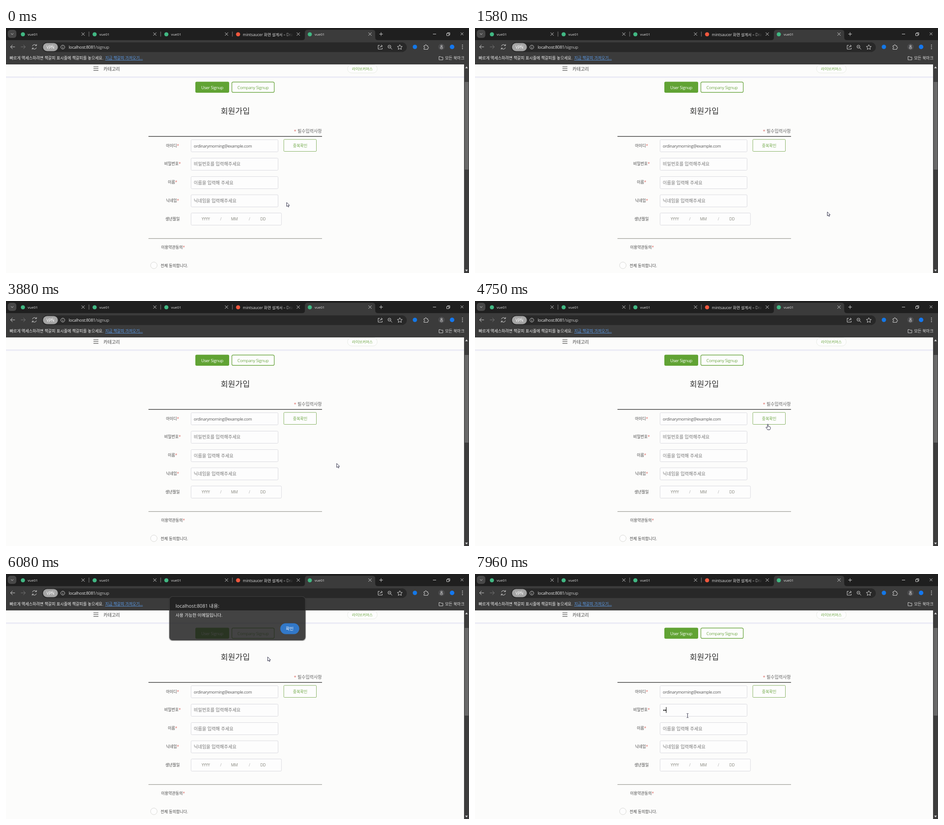
An HTML page that plays this animation: 1027 by 545 pixels, repeating every 8000 ms.

```html
<!DOCTYPE html>
<html lang="ko">
<head>
<meta charset="utf-8">
<title>회원가입</title>
<style>
  html, body { margin: 0; width: 100%; height: 100%; overflow: hidden; background: #fcfcfb; }
  svg { display: block; width: 100%; height: 100%; }
  text { font-family: "Open Sans", "Noto Sans CJK KR", "Noto Sans CJK", sans-serif; white-space: pre; }
  .tight { letter-spacing: -.3px; }
  .line { fill: none; stroke: #d4d4d4; stroke-width: 1; }
  .field { fill: #fdfdfd; stroke: #d9d9df; }
</style>
</head>
<body>
<svg viewBox="0 0 1027 545">
  <defs>
    <linearGradient id="shade" x2="0" y2="1">
      <stop stop-color="#e0e0f2"/><stop offset="1" stop-color="#fcfcfb"/>
    </linearGradient>
    <linearGradient id="fade">
      <stop stop-color="#1f1f1f" stop-opacity="0"/><stop offset="1" stop-color="#1f1f1f"/>
    </linearGradient>
  </defs>

  <!-- Browser frame -->
  <rect width="1027" height="28" fill="#1f1f1f"/>
  <rect y="27" width="1027" height="54" fill="#3b3b3b"/>
  <path d="M657 27q6 0 6-6V10q0-6 6-6h144q6 0 6 6v11q0 6 6 6z" fill="#3b3b3b"/>
  <rect x="4" y="4" width="19" height="18" rx="6" fill="#484848"/>
  <path class="line" d="M11 12l2.700 2.700L16.400 12"/>
  <g id="tabs"></g>
  <path class="line" d="M828 13.500h8m-4-4v8M947 13.500h7M1008.500 10l6 6m0-6l-6 6M977.500 12h5v5h-5zM979.500 12v-1.500h5v5H982.500"/>

  <!-- Toolbar -->
  <rect x="80" y="32" width="809" height="21.500" rx="10.700" fill="#282828"/>
  <path class="line" d="M20 42H10m4.500-4.500L10 42l4.500 4.500"/>
  <path class="line" style="stroke:#777" d="M33 42h10m-4.500-4.500L43 42l-4.500 4.500"/>
  <path class="line" d="M58.500 40.500a4.800 4.800 0 0 1 8.500-1.700m.8-2.800v3.300h-3.300M67.500 43.500a4.800 4.800 0 0 1-8.500 1.700m-.8 2.800v-3.300h3.300"/>
  <rect x="82" y="33.500" width="33" height="18" rx="9" fill="#a5a5a5"/>
  <path class="line" d="M94 47.500l10-10.500"/>
  <circle class="line" cx="126" cy="42.500" r="4.300"/>
  <path class="line" d="M126 40v.9m0 1.200v2.900"/>
  <path class="line" d="M829 38.500h-3.500v8.500h9v-3M829 44q.5-4 5-4m-2-2.500l3 2.500-3 2.500"/>
  <circle class="line" cx="850.500" cy="41.500" r="3.300"/>
  <path class="line" d="M853 44l3.500 3.500M849 41.500h3"/>
  <path class="line" d="M873.500 37l1.600 3.700 4 .4-3 2.700.9 4-3.500-2.100-3.500 2.100.9-4-3-2.700 4-.4z"/>
  <circle cx="907" cy="42" r="4.800" fill="#1478e8"/>
  <path class="line" d="M927 39.500h2.500q0-2.500 1.700-2.500t1.700 2.500h2.600v2.600q2 0 2 1.600t-2 1.600v2.200H927v-2.500q2-.2 2-1.400t-2-1.400z"/>
  <circle cx="966" cy="42" r="7" fill="#4c4c4e"/>
  <circle class="line" cx="966" cy="40" r="1.700"/>
  <ellipse class="line" cx="966" cy="44.300" rx="2.800" ry="1.800"/>
  <circle cx="989.500" cy="42" r="5" fill="#1478f0"/>
  <path d="M1012.500 38v.1m0 3.900v.1m0 3.900v.1" stroke="#e4e4e4" stroke-width="2" stroke-linecap="round"/>
  <path class="line" d="M960.500 63.500h3.200l1.200 1.400h4.100v6h-8.500z"/>

  <!-- Page -->
  <rect y="81" width="1016" height="464" fill="#fcfcfb"/>
  <rect y="108" width="1016" height="4" fill="url(#shade)"/>
  <path d="M194 86.500h11M194 90.500h11M194 94.500h11" stroke="#333" stroke-width="1.200"/>
  <rect x="757.500" y="81.500" width="66" height="18.500" rx="9.200" fill="#fdfdfd" stroke="#e8ece4"/>
  <rect x="420" y="119.500" width="75" height="24.500" rx="3" fill="#61a334"/>
  <rect x="501" y="120.200" width="94" height="23" rx="3" fill="#fdfdfd" stroke="#70a947" stroke-width="1.400"/>
  <path d="M316 241.200h385" stroke="#454545" stroke-width="1.600"/>
  <path d="M316 468.300h385" stroke="#85857c"/>
  <g id="fields"></g>
  <rect x="616.200" y="247.900" width="72.300" height="26.600" rx="1.500" fill="#fdfdfd" stroke="#86b162"/>
  <circle cx="328" cy="528" r="7.300" fill="#fdfdfd" stroke="#d9d9d6"/>
  <g id="labels"></g>
  <text id="hint" x="416.500" y="306" font-size="10" fill="#777">비밀번호를 입력해주세요</text>
  <g id="dots" fill="#222"><circle cx="419" cy="303" r="1.500"/><circle cx="422.600" cy="303" r="1.500"/></g>
  <path id="caret" d="M0 296v13" stroke="#222" stroke-width="1.200"/>

  <!-- Scrollbar -->
  <rect x="1016" y="81" width="11" height="464" fill="#3d3d3d"/>
  <rect x="1017.500" y="120" width="8.500" height="195" fill="#696969"/>
  <path d="M1018.500 89.500l3-4 3 4zM1018.500 537.500l3 4 3-4z" fill="#d8d8d8"/>

  <!-- Alert -->
  <g id="alert">
    <rect x="362" y="57" width="302.500" height="98" rx="8" fill="#000" opacity=".18"/>
    <rect x="363.500" y="56.500" width="299.500" height="96.500" rx="7" fill="#1f1f1f" stroke="#484848"/>
    <rect id="ring" x="605.500" y="113" width="46" height="28.500" rx="14.200" fill="none" stroke="#1673dd" stroke-width="1.300"/>
    <rect id="confirm" x="607.700" y="115.200" width="41.800" height="24.200" rx="12.100"/>
    <g id="alertText"></g>
  </g>

  <g id="cursor" stroke="#34344c" fill="#fff" stroke-linejoin="round">
    <path id="arrow" d="M0 0v9l2.100-1.800 1.500 3.100 1.500-.7-1.500-2.900h2.900z"/>
    <path id="hand" d="M-1 1q0-1.200 1-1.200t1 1.200v4l4 1q1 .3 1 1.500-.2 3-1.500 5H-.5q-1-2-3.500-4.700-.4-1.500 1-1.300l2 1.300z"/>
    <path id="beam" d="M-2-4.500h1.500l.5.500.5-.5H2M0-4v8m-2 .5h1.500L0 4l.5.500H2" fill="none"/>
  </g>
</svg>
<script>
const $ = id => document.getElementById(id);
const add = (id, markup) => $(id).insertAdjacentHTML('beforeend', markup);

// Text placed by its vertical middle.
const label = (x, middle, size, fill, words, extra = '') =>
  `<text x="${x}" y="${middle + size * .37}" font-size="${size}" fill="${fill}" ${extra}>${words}</text>`;
const MIDDLE = 'text-anchor="middle" ', TIGHT = 'class="tight"', MEDIUM = 'font-weight="500"';
const STAR = '<tspan fill="#d86058">*</tspan>';

for (let i = 0; i < 5; i++) {
  const x = 37.5 + i * 159.1;
  const design = i === 3;
  add('tabs', `<circle cx="${x}" cy="14" r="4.600" fill="${design ? '#f2583e' : '#41b883'}"/>`
    + label(x + 10.5, 14.5, design ? 8.5 : 8, '#e0e0e0', design ? 'mintsaucer 화면 설계서 – Draft' : 'vue01')
    + (design ? '<rect x="619" y="6" width="18" height="17" fill="url(#fade)"/><rect x="637" y="6" width="20" height="17" fill="#1f1f1f"/>' : '')
    + `<path class="line" d="M${x + 130} 10l7 7m0-7l-7 7"/>`
    + (i < 3 ? `<path d="M${x + 146.5} 8v11" stroke="#777" stroke-width="1.200"/>` : ''));
}

for (const [y, width] of [[248.5, 193], [289.5, 193], [330.5, 193], [371, 193], [411.5, 200.5]])
  add('fields', `<rect class="field" x="410.500" y="${y}" width="${width}" height="27" rx="2"/>`);

add('labels', [
  label(139, 42.5, 9.4, '#e8e8e8', 'localhost:8081<tspan fill="#c4c4c4">/signup</tspan>', TIGHT),
  label(98.5, 42.5, 9, '#fff', 'VPN', MIDDLE),
  label(8, 67, 8.8, '#f2f2f2', '빠르게 액세스하려면 책갈피 표시줄에 책갈피를 놓으세요.', MEDIUM),
  label(220, 67, 8.7, '#5b9be8', '지금 책갈피 가져오기...', 'text-decoration="underline"'),
  label(974, 67, 8.8, '#dedede', '모든 북마크'),
  label(216, 91, 10, '#444', '카테고리'),
  label(790.5, 90.5, 8.3, '#70a947', '라이브커머스', MIDDLE),
  label(457.5, 132.5, 9.3, '#fff', 'User Signup', MIDDLE + TIGHT),
  label(548, 132.5, 9.3, '#70a947', 'Company Signup', MIDDLE + TIGHT),
  label(508.5, 184, 17.6, '#333', '회원가입', MIDDLE),
  label(700.5, 229.5, 9.8, '#666', STAR + ' 필수입력사항', 'text-anchor="end"'),
  label(369.5, 261.5, 8.7, '#444', '아이디' + STAR, MIDDLE),
  label(369.5, 302, 8.7, '#444', '비밀번호' + STAR, MIDDLE),
  label(369.5, 343, 8.7, '#444', '이름' + STAR, MIDDLE),
  label(369.5, 384, 8.7, '#444', '닉네임' + STAR, MIDDLE),
  label(369.5, 425, 8.7, '#444', '생년월일', MIDDLE),
  label(416.5, 263, 9.1, '#555', 'ordinarymorning@example.com', TIGHT),
  label(416.5, 344, 10, '#777', '이름을 입력해 주세요'),
  label(416.5, 384.5, 10, '#777', '닉네임을 입력해주세요'),
  label(652.5, 262, 8.7, '#70a947', '중복확인', MIDDLE),
  label(443, 425, 8.6, '#85857c', 'YYYY', MIDDLE + TIGHT),
  label(476.5, 425, 8.6, '#aaa', '/', MIDDLE),
  label(506.5, 425, 8.6, '#85857c', 'MM', MIDDLE + TIGHT),
  label(540, 425, 8.6, '#aaa', '/', MIDDLE),
  label(570, 425, 8.6, '#85857c', 'DD', MIDDLE + TIGHT),
  label(344, 488, 8.7, '#444', '이용약관동의' + STAR),
  label(343, 528.5, 8.7, '#444', '전체 동의합니다.'),
].join(''));

add('alertText', label(377, 77.5, 10.6, '#fff', 'localhost:8081 내용:')
  + label(377, 97.5, 9.5, '#f0f0f0', '사용 가능한 이메일입니다.')
  + label(628.5, 127.5, 9.2, '#fff', '확인', MIDDLE));

// Pointer stops: time, x, y.
const stops = [
  [0, 622.5, 388], [250, 622.5, 388], [1250, 781.5, 409], [1800, 781.5, 409], [2300, 779.5, 409],
  [3500, 779.5, 409], [4450, 649.5, 274], [5250, 649.5, 274], [5750, 626, 130],
  [5860, 626, 130], [6080, 580.5, 184.5], [6250, 553, 217], [6900, 471.5, 315], [8000, 471.5, 315],
];
const clamp = v => Math.max(0, Math.min(1, v));
const ease = v => v * v * (3 - 2 * v);

function pointerAt(t) {
  const i = stops.findIndex(s => s[0] > t);
  const [t0, x0, y0] = stops[i - 1], [t1, x1, y1] = stops[i];
  const k = ease((t - t0) / (t1 - t0));
  return [x0 + (x1 - x0) * k, y0 + (y1 - y0) * k];
}

const show = (id, on) => $(id).style.display = on ? '' : 'none';

function draw(now) {
  const t = now % 8000;
  const [x, y] = pointerAt(t);
  const inside = (left, top, right, bottom) => x > left && x < right && y > top && y < bottom;
  const hand = t < 5260 && inside(616, 247, 689, 275);
  const beam = inside(410, 248, 604, 276) || inside(410, 289, 604, 318);
  $('cursor').setAttribute('transform', `translate(${x} ${y})`);
  show('hand', hand);
  show('beam', beam);
  show('arrow', !hand && !beam);

  // The alert rises and grows slightly while it fades out.
  const opening = clamp((t - 4960) / 110), closing = clamp((t - 6000) / 200);
  const rise = 6 * (1 - opening) + 14.5 * closing, scale = 1 + .018 * closing;
  show('alert', opening > 0 && closing < 1);
  $('alert').setAttribute('opacity', opening * (1 - closing * closing));
  $('alert').setAttribute('transform', `translate(513 ${105 - rise}) scale(${scale}) translate(-513 -105)`);
  show('ring', closing === 0);
  $('confirm').setAttribute('fill', closing ? '#0b5fbe' : '#0b71e6');

  const typed = (t >= 7600) + (t >= 7850);
  show('hint', !typed);
  [...$('dots').children].forEach((dot, i) => dot.style.display = i < typed ? '' : 'none');
  show('caret', t >= 7050 && (typed || (t - 7050) % 1000 < 500));
  $('caret').setAttribute('transform', `translate(${417 + typed * 3.6} 0)`);
  requestAnimationFrame(() => draw(performance.now() - start));
}
const start = performance.now();
draw(0);
</script>
</body>
</html>
```
